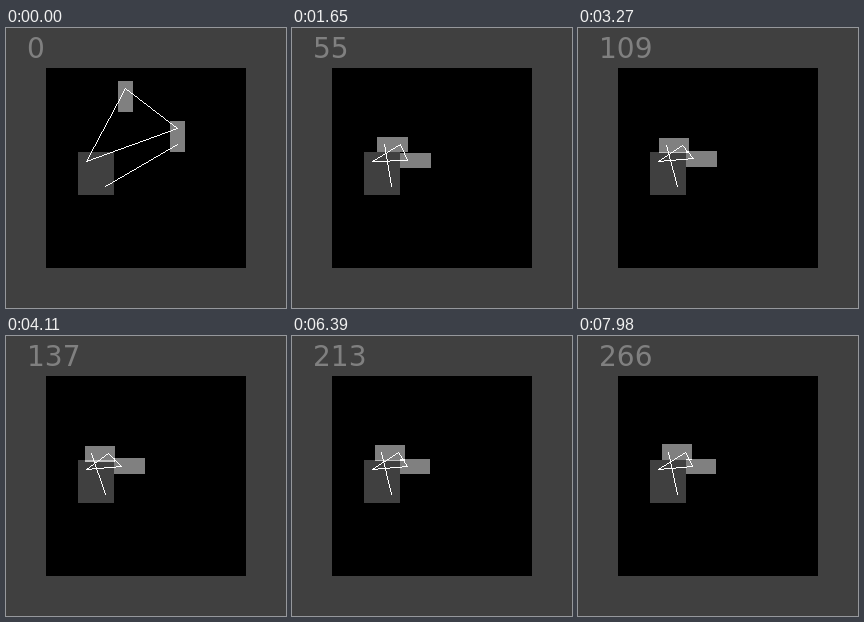
An HTML page with a canvas for the animation above (8 s loop, 280 px wide and 280 px high).

```html
<!DOCTYPE html>
<html>
<head>
<meta charset="utf-8">
<style>
  html, body { margin: 0; width: 100%; height: 100%; overflow: hidden; background: #404040; }
  canvas { display: block; }
</style>
</head>
<body>
<canvas id="stage" width="280" height="280"></canvas>
<script>
const ctx = document.getElementById('stage').getContext('2d');
const LOOP = 8000, STEP = 30;
const LONG = 15.2, SHORT = 7.6, PIN = 8.1;
const ANCHOR = [80, 133], OUTLET = [99, 158];

// Key poses are [step, centre x, centre y]; a block lies down at step "turn".
const upper = {
  turn: 14, side: -1,
  poses: [[0, 119.5, 68.5], [32, 120.8, 135], [50, 123.6, 133], [137, 123.6, 130], [266, 122.9, 130.5]]
};
const lower = {
  turn: 3, side: 1,
  poses: [[0, 171.5, 108.5], [5, 182, 112], [27, 92.7, 163.2], [50, 101, 116.5],
    [137, 94, 117.9], [181, 97.5, 117.5], [266, 99, 116]]
};

const mix = (a, b, u) => a + (b - a) * u;

function centre(poses, n) {
  const next = Math.max(1, poses.findIndex(pose => pose[0] >= n));
  const [n0, x0, y0] = poses[next - 1], [n1, x1, y1] = poses[next];
  const u = (n - n0) / (n1 - n0);
  return [mix(x0, x1, u), mix(y0, y1, u)];
}

function box(color, left, top, right, bottom) {
  ctx.fillStyle = color;
  ctx.fillRect(left, top, right - left, bottom - top);
}

// Draws a block and returns the positions of its two pins.
function drawBlock({ poses, turn, side }, n) {
  const [x, y] = centre(poses, n);
  const flat = n >= turn;
  const [w, h] = flat ? [LONG, SHORT] : [SHORT, LONG];
  box('#808080', ...[x - w, y - h, x + w, y + h].map(Math.round));
  const [dx, dy] = flat ? [side * PIN, 0] : [0, -PIN];
  return [1, -1].map(s => [Math.floor(x + s * dx), Math.floor(y + s * dy)]);
}

// Crisp one-pixel line without antialiasing.
function line([x0, y0], [x1, y1]) {
  const count = Math.max(Math.abs(x1 - x0), Math.abs(y1 - y0), 1);
  ctx.fillStyle = '#fff';
  for (let i = 0; i <= count; i++) {
    ctx.fillRect(Math.round(mix(x0, x1, i / count)), Math.round(mix(y0, y1, i / count)), 1, 1);
  }
}

function draw(time) {
  const n = Math.floor((time % LOOP) / STEP);
  box('#404040', 0, 0, 280, 280);
  box('#000', 40, 40, 240, 240);
  box('#404040', 72, 124, 108, 167);

  // Overlapping blocks add up their brightness.
  ctx.globalCompositeOperation = 'lighter';
  const [tip] = drawBlock(upper, n);
  const [near, far] = drawBlock(lower, n);
  ctx.globalCompositeOperation = 'source-over';

  line(ANCHOR, tip);
  line(tip, near);
  line(near, ANCHOR);
  line(far, OUTLET);

  ctx.fillStyle = '#808080';
  ctx.font = '28px "DejaVu Sans", sans-serif';
  ctx.fillText(n, 21, 30);
}

const start = performance.now();
function tick() {
  draw(performance.now() - start);
  requestAnimationFrame(tick);
}
tick();
</script>
</body>
</html>
```
